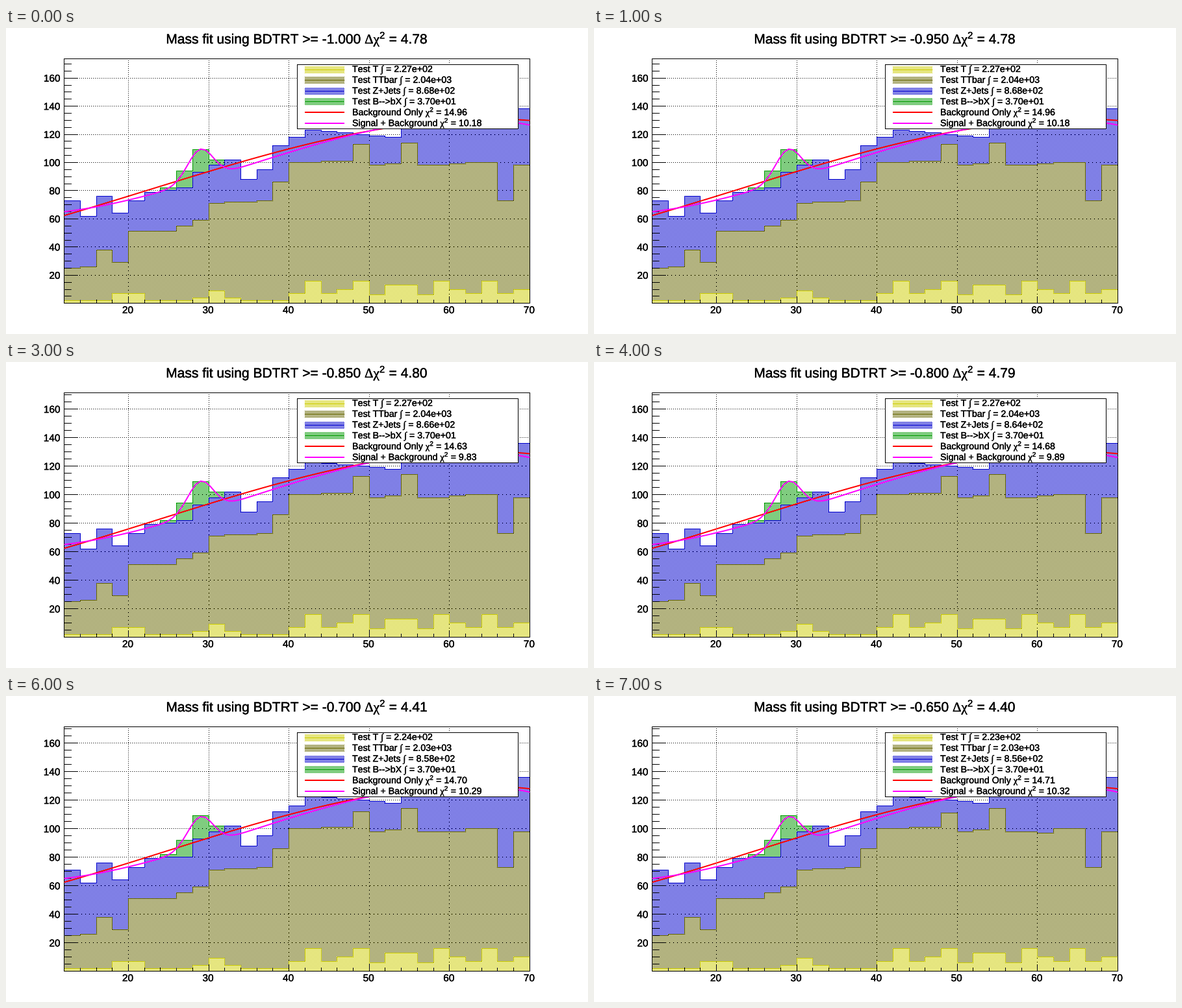
These frames come from a looping animation (896x472 px, 8 s). A matplotlib script:

```python
import numpy as np
import matplotlib.pyplot as plt
from matplotlib.animation import FuncAnimation
from matplotlib.patheffects import withStroke

W, H, DPI = 896, 472, 64
PX = 72 / DPI
LEFT, RIGHT, TOP, BOTTOM = 89.6, 806.4, 47.2, 424.8
BLACK, YELLOW, OLIVE = (0, 0, 0), (204, 204, 0), (102, 102, 0)
BLUE, GREEN = (0, 0, 204), (0, 153, 0)
RED, PINK = "#ff0000", "#ff00ff"

plt.rcParams.update({
    "font.family": ["Liberation Sans", "DejaVu Sans"],
    "mathtext.fontset": "custom",
    "mathtext.default": "regular",
    "mathtext.rm": "Liberation Sans",
    "mathtext.cal": "Liberation Serif",
})
CHI2 = r"$\mathcal{\chi}^2$"
INTEGRAL = r"$\mathcal{∫}$"

STEPS = 8
EDGES = np.arange(12, 71, 2)
MID = EDGES[:-1] + 1

# Turning points of the stacked heights, bin centre: height
PAIR = {13: 25, 15: 26, 17: 38, 19: 29, 21: 51, 25: 51, 29: 59, 31: 71,
        37: 73, 41: 100, 47: 101, 49: 113, 51: 98, 53: 99, 55: 114, 57: 98,
        65: 100, 67: 73, 69: 98}
JETS = {13: 73, 15: 62, 17: 76, 19: 64, 21: 73, 23: 79, 27: 82, 29: 93,
        33: 102, 35: 88, 37: 95, 39: 112, 43: 123, 53: 118}

CHI_BKG = [14.96, 14.96, 14.97, 14.63, 14.68, 14.73, 14.70, 14.712]
CHI_SIG = [10.18, 10.18, 10.21, 9.83, 9.89, 9.95, 10.29, 10.316]

rows, cols = np.indices((H, W))
CHECKER = (rows + cols) % 2 == 1


def x_pos(x):
    return LEFT + (np.asarray(x) - 12) * (RIGHT - LEFT) / 58


def y_pos(v, top):
    return BOTTOM - np.asarray(v) * (BOTTOM - TOP) / top


def y_max(step):
    return 173.8 if step < 3 else 171.6


def late_cuts(step):
    return max(step - 5, 0)


def along(points, x):
    return np.interp(x, list(points), list(points.values()))


def bump(x, height, centre, width):
    return height * np.exp(-((x - centre) / width) ** 2 / 2)


def stack(step):
    """Cumulative bin heights, lowest layer first."""
    late = late_cuts(step)
    early_wave = 2 + 7 * np.cos(np.pi * (MID - 20) / 11) ** 8
    late_wave = 11 + 5.5 * np.cos(2 * np.pi * (MID - 43) / 5.5)
    single = np.where(MID < 42, early_wave, late_wave)

    # Tighter cuts lose a few events
    pair = along(PAIR, MID)
    pair[18::6] -= late
    jets = np.where(MID < 54, along(JETS, MID), 0.794 * y_max(step))
    jets[:21:7] -= 2 * min(late, 1)
    total = jets + np.round(bump(MID, 17, 28.4, 1.65))
    return [np.round(layer) for layer in (single, pair, jets, total)]


def fill(img, x0, x1, y0, y1, ink):
    box = np.s_[y0:y1, x0:x1]
    img[box][CHECKER[box]] = ink


def frame_box(img, x0, y0, x1, y1):
    img[[y0, y1], x0:x1 + 1] = BLACK
    img[y0:y1 + 1, [x0, x1]] = BLACK


def draw_hist(img, values, top, ink):
    xs = x_pos(EDGES).astype(int)
    ys = y_pos(values, top).astype(int)
    for x0, x1, y in zip(xs, xs[1:], ys):
        fill(img, x0, x1, y, 425, ink)
        img[y, x0:x1 + 1] = ink
    for x, a, b in zip(xs[1:], ys, ys[1:]):
        img[min(a, b):max(a, b) + 1, x] = ink


def draw_plot(step):
    img = np.full((H, W, 3), 255, np.uint8)
    top = y_max(step)
    for x in range(20, 70, 10):
        img[47:425:3, int(x_pos(x))] = BLACK
    for v in range(20, 161, 20):
        img[int(y_pos(v, top)), 89:807:3] = BLACK

    for values, ink in zip(stack(step)[::-1], (GREEN, BLUE, OLIVE, YELLOW)):
        draw_hist(img, values, top, ink)

    for x in range(12, 71, 2):
        size = 11 if x % 10 == 0 else 6
        img[425 - size:425, int(x_pos(x))] = BLACK
    for v in range(0, int(top) + 1, 5):
        size = 22 if v % 20 == 0 else 12
        img[int(y_pos(v, top)), 89:89 + size] = BLACK
    frame_box(img, 89, 47, 806, 424)
    return img


def draw_legend():
    img = np.full((H, W, 3), 255, np.uint8)
    for i, ink in enumerate((YELLOW, OLIVE, BLUE, GREEN)):
        y = int(64 + 16.55 * i)
        fill(img, 460, 521, y - 5, y + 6, ink)
        img[y, 460:521] = ink
    frame_box(img, 448, 56, 788, 155)
    return img[56:156, 448:789]


def cubic(points):
    return np.poly1d(np.polyfit(list(points), list(points.values()), 3))


def fit_curves(step):
    x = np.linspace(12, 70, 100)
    drop = 0 if step < 3 else 1.2 if step < 6 else 2
    red = cubic({12: 62.5, 20: 76, 30: 93.5, 40: 110, 50: 122.5,
                 60: 129.5, 70: 130 - drop})
    base = cubic({12: 65.5, 20: 73, 24: 78.5, 33: 95, 40: 108, 50: 122.5,
                  60: 129.5, 70: 127 - drop / 2})
    peak = 22 - min(late_cuts(step), 1)
    return x, red(x), base(x) + bump(x, peak, 28.95, 1.6)


fig = plt.figure(figsize=(W / DPI, H / DPI), dpi=DPI, facecolor="white")
ax = fig.add_axes([0, 0, 1, 1])
ax.axis("off")


def show(img, x, y, z):
    h, w = img.shape[:2]
    return ax.imshow(img, extent=(x, x + w, y + h, y), aspect="auto",
                     interpolation="nearest", zorder=z)


def label(x, y, size, text="", ha="left"):
    heavier = withStroke(linewidth=0.35 * PX, foreground="black")
    return ax.text(x, y, text, fontsize=size * PX, ha=ha, va="baseline",
                   color="black", zorder=4, path_effects=[heavier])


def curve(color, x=(), y=(), z=1):
    return ax.plot(x, y, color=color, lw=2 * PX, zorder=z,
                   solid_capstyle="butt")[0]


plot = show(draw_plot(0), 0, 0, 0)
show(draw_legend(), 448, 56, 2)
ax.set_xlim(0, W)
ax.set_ylim(H, 0)

red_line, pink_line = curve(RED), curve(PINK)
curve(RED, [460, 521], [130, 130], 3)
curve(PINK, [460, 521], [147, 147], 3)

title = label(448, 24, 21, ha="center")
entries = [label(533, 68 + 16.65 * i, 14.2) for i in range(6)]
y_labels = {v: label(83.5, 0, 15.4, str(v), "right") for v in range(20, 161, 20)}
for v in range(20, 71, 10):
    label(float(x_pos(v)) - 1, 440, 15.4, str(v), "center")


def update(step):
    top = y_max(step)
    plot.set_data(draw_plot(step))
    x, red, pink = fit_curves(step)
    red_line.set_data(x_pos(x), y_pos(red, top))
    pink_line.set_data(x_pos(x), y_pos(pink, top))

    cut = -1 + 0.05 * step
    bkg, sig = CHI_BKG[step], CHI_SIG[step]
    title.set_text(rf"Mass fit using BDTRT >= {cut:.3f} "
                   rf"$\mathcal{{\Delta\chi}}^2$ = {bkg - sig:.2f}")

    late = late_cuts(step)
    tightened = min(late, 1)
    yields = {
        "T": 227 - late - 2 * tightened,
        "TTbar": 2040 - 10 * tightened,
        "Z+Jets": 868 - 2 * max(step - 2, 0) - 2 * tightened,
        "B-->bX": 37,
    }
    texts = [f"Test {name} {INTEGRAL} = {n:.2e}" for name, n in yields.items()]
    texts += [f"Background Only {CHI2} = {bkg:.2f}",
              f"Signal + Background {CHI2} = {sig:.2f}"]
    for entry, text in zip(entries, texts):
        entry.set_text(text)
    for v, item in y_labels.items():
        item.set_y(float(y_pos(v, top)) + 5.5)
    return []


anim = FuncAnimation(fig, update, frames=STEPS, interval=1000,
                     init_func=lambda: update(0), repeat=True, repeat_delay=0)
plt.show()
```
